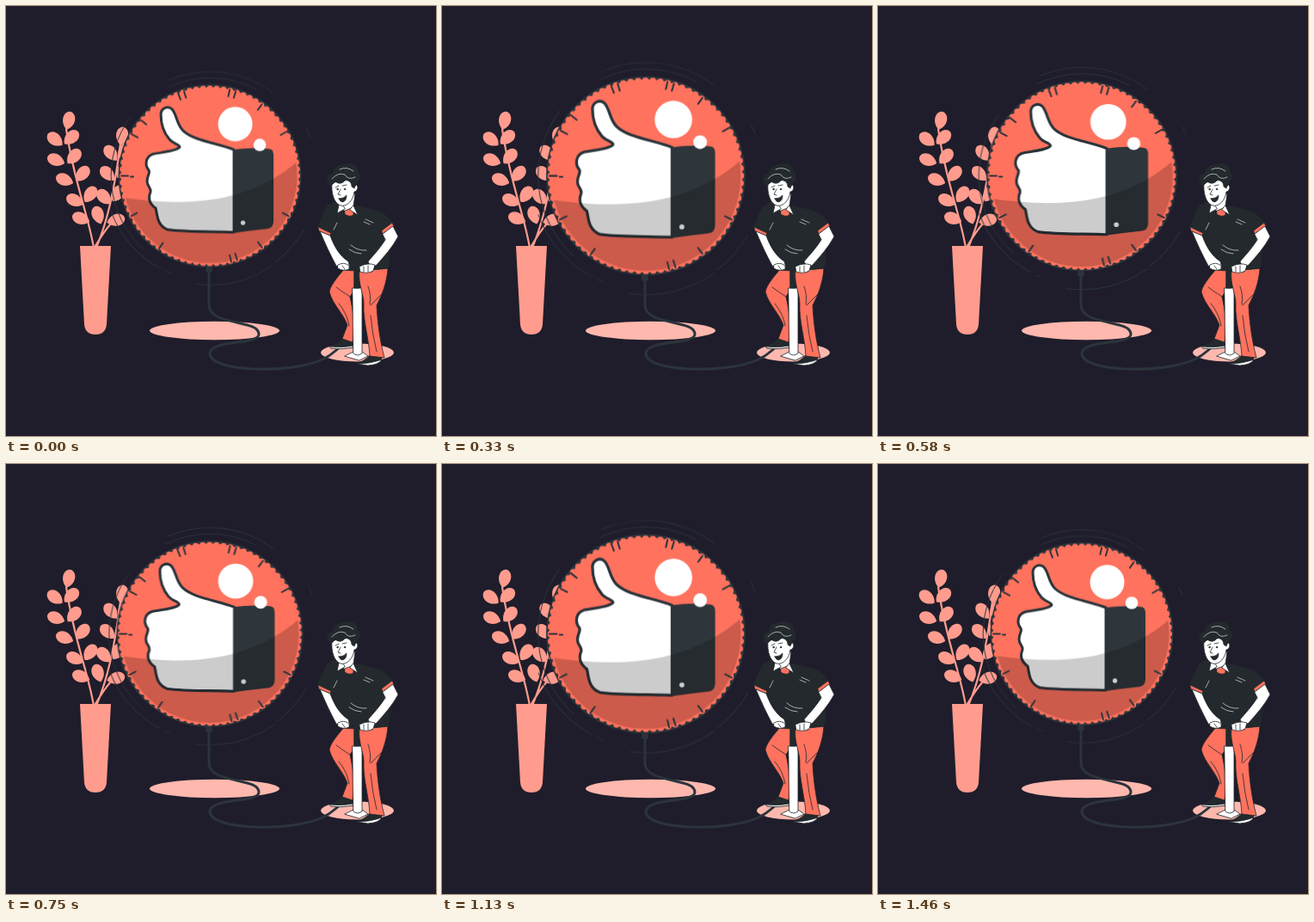
Animation, 500 px wide and 500 px high, one loop 1.5 s. Source, as an HTML page without scripts:

```html
<!DOCTYPE html>
<html lang="en">
<head>
<meta charset="utf-8">
<title>Inflating a thumbs-up balloon</title>
<style>
  html, body { margin: 0; width: 100%; height: 100%; overflow: hidden; background: #1f1d2b; }
  svg { display: block; width: 100vw; height: 100vh; }
  .dark { fill: #23292c; }
  .coral { fill: #ff725e; }
  .soft { fill: #ff9c8e; }
  .pale { fill: #ffb8ae; }
  .white { fill: #fff; }
  .line { fill: none; stroke: #2b343b; stroke-linecap: round; stroke-linejoin: round; }
  .thin { stroke: #23292c; stroke-width: .8; stroke-linejoin: round; stroke-linecap: round; }
  .crease { fill: none; stroke: #dfe2e3; stroke-width: .7; stroke-linecap: round; }
  .stem { fill: none; stroke: #ff9c8e; stroke-width: 2.2; stroke-linecap: round; }
  .balloon { animation: inflate 1.5s linear infinite; }
  @keyframes inflate {
    0% { transform: scale(1); }
    11.3% { transform: scale(1.056); }
    20.5% { transform: scale(1.09); }
    23% { transform: scale(1.088); }
    38.7% { transform: scale(1.042); }
    59.7% { transform: scale(1); }
    75.2% { transform: scale(1.09); }
    97.3%, 100% { transform: scale(1); }
  }
</style>
</head>
<body>
<svg viewBox="0 0 500 500">
  <defs>
    <path id="leaf" d="M0 11C-9 5-9-7-2-10Q0-11 2-10C9-7 9 5 0 11Z"/>
    <path id="tick" d="M95 0H103"/>
    <clipPath id="inside"><circle cx="237" cy="197.5" r="101.5"/></clipPath>
  </defs>

  <rect width="500" height="500" fill="#1f1d2b"/>
  <ellipse class="pale" cx="242.5" cy="377.5" rx="75.5" ry="10.7"/>

  <g class="soft">
    <path class="stem" d="M102 281C95 240 79 205 70 143M105 281C118 250 126 215 133 160M104 279Q114 262 122 253"/>
    <use href="#leaf" transform="translate(73 133) rotate(12)"/>
    <use href="#leaf" transform="translate(57 155) rotate(-52)"/>
    <use href="#leaf" transform="translate(76 153) rotate(48)"/>
    <use href="#leaf" transform="translate(58 179) rotate(-68)"/>
    <use href="#leaf" transform="translate(79 175) rotate(42)"/>
    <use href="#leaf" transform="translate(68 202) rotate(-68)"/>
    <use href="#leaf" transform="translate(89 195) rotate(40)"/>
    <use href="#leaf" transform="translate(80 226) rotate(-65)"/>
    <use href="#leaf" transform="translate(98 219) rotate(35)"/>
    <use href="#leaf" transform="translate(87 247) rotate(-68)"/>
    <use href="#leaf" transform="translate(107 243) rotate(-18)"/>
    <use href="#leaf" transform="translate(135 151) rotate(8)"/>
    <use href="#leaf" transform="translate(122 171) rotate(-38)"/>
    <use href="#leaf" transform="translate(138 168) rotate(40)"/>
    <use href="#leaf" transform="translate(118 195) rotate(-45)"/>
    <use href="#leaf" transform="translate(136 191) rotate(35)"/>
    <use href="#leaf" transform="translate(114 222) rotate(-42)"/>
    <use href="#leaf" transform="translate(130 218) rotate(32)"/>
    <use href="#leaf" transform="translate(128 249) rotate(75)"/>
    <path d="M86 279H122L117 370Q116 382 104 382T91 370Z"/>
  </g>

  <ellipse class="pale" cx="408.5" cy="403" rx="42.5" ry="10.5"/>
  <path class="line" stroke-width="3" d="M236 300V348C236 372 295 364 294 382C293 394 238 388 237 404C237 426 331 428 368 411C388 402 384 392 407 392"/>

  <g transform="translate(237 197.5)">
    <g class="balloon">
      <g class="line" stroke-width=".9">
        <circle r="121" pathLength="360" stroke-dasharray="60 300" transform="rotate(-113)"/>
        <circle r="114" pathLength="360" stroke-dasharray="54 306" transform="rotate(-116)"/>
        <circle r="125" pathLength="360" stroke-dasharray="5 355" transform="rotate(-26)"/>
        <circle r="126" pathLength="360" stroke-dasharray="23 337" transform="rotate(30)"/>
        <circle r="127" pathLength="360" stroke-dasharray="43 317" transform="rotate(55)"/>
        <circle r="122" pathLength="360" stroke-dasharray="3 3 42 312" transform="rotate(112)"/>
        <circle r="115" pathLength="360" stroke-dasharray="85 275" transform="rotate(132)"/>
      </g>
      <path fill="#2b343b" d="M-4 105H2L3 112H-5Z"/>
      <circle r="106.5" fill="#2b343b"/>
      <circle class="coral" r="103"/>
      <circle r="101.5" fill="none" stroke="#ff725e" stroke-width="7" stroke-linecap="round" pathLength="80" stroke-dasharray="0 1"/>

      <g transform="translate(-237 -197.5)">
        <path class="line" style="fill:#fff" stroke-width="3" d="M265 167C245 159 219 157 206 145C198 137 199 127 193 120C188 115 180 119 180 126C180 140 184 148 190 155C194 160 202 161 202 164C198 169 181 170 171 172C162 175 161 185 166 191C168 194 164 197 164 204C164 210 169 211 168 216C165 223 167 230 174 235C176 242 175 255 188 260C209 263 239 262 265 263Z"/>
        <path fill="#2e363b" d="M264 167Q285 164 305 166Q311 166 311 173V250Q311 258 304 259Q285 261 264 264Z"/>
        <circle cx="275.5" cy="252" r="2.7" fill="#fff"/>
        <path clip-path="url(#inside)" fill="#000" opacity=".2" d="M130 222C203 233 283 234 345 175V305H130Z"/>
        <circle class="white" cx="266.5" cy="137.3" r="20"/>
        <circle class="white" cx="295" cy="161.5" r="7.3"/>
      </g>

      <g class="line" stroke-width="1.9">
        <use href="#tick" transform="rotate(-111)"/>
        <use href="#tick" transform="rotate(-107)"/>
        <use href="#tick" transform="rotate(-77)"/>
        <use href="#tick" transform="rotate(-73)"/>
        <use href="#tick" transform="rotate(-54)"/>
        <use href="#tick" transform="rotate(-30)"/>
        <use href="#tick" transform="rotate(27)"/>
        <use href="#tick" transform="rotate(54)"/>
        <use href="#tick" transform="rotate(72)"/>
        <use href="#tick" transform="rotate(76)"/>
        <use href="#tick" transform="rotate(125)"/>
        <use href="#tick" transform="rotate(153)"/>
        <use href="#tick" transform="rotate(180)"/>
        <use href="#tick" transform="rotate(-152)"/>
        <use href="#tick" transform="rotate(-141)"/>
        <path d="M-92 1H-89"/>
      </g>
    </g>
  </g>

  <g class="thin">
    <path class="dark" d="M377 396Q386 393 391 387L404 391V397Q390 399 379 398Z"/>
    <path class="white" d="M377 396Q390 398 404 395V397Q390 400 378 398Z"/>
    <path class="coral" d="M393 306C387 314 378 323 376 332C379 346 392 357 397 371L391 387L403 391C407 373 403 352 400 338L412 320V306Z"/>
    <path fill="none" d="M384 327Q392 333 400 338M387 346Q397 358 399 372"/>
    <path class="white" d="M394 407L404 402H414L421 407L411 412Z"/>
    <path class="white" d="M403 328H414V404Q408 408 404 404Z"/>
    <path class="dark" d="M405 307H411V328H405Z"/>
    <path class="dark" d="M408 416Q418 412 423 406L438 408Q435 415 422 417Z"/>
    <path class="white" d="M408 416Q424 416 437 411Q434 417 421 418Z"/>
    <path class="coral" d="M411 307L444 305C443 320 438 335 431 348C432 369 435 390 440 409L423 407C422 386 415 366 416 346C416 335 409 323 411 307Z"/>
    <path fill="none" d="M437 335L424 348M421 326Q425 337 423 347M424 360Q426 382 431 402"/>

    <path class="white" d="M390 226L406 218L404 233L410 240L400 248L388 236Z"/>
    <path class="dark" d="M383 227L373 233L362 257L377 265L381 274L391 292L396 304Q420 309 444 305Q450 292 440 265L450 253Q441 240 428 237L407 232L399 244Z"/>
    <path class="coral" d="M394 238L404 234L404 243Q399 246 394 242Z"/>
    <path class="white" d="M388 227L385 241L394 236ZM404 232L409 243L400 237Z"/>
    <path class="coral" d="M363 257L378 264L377 267L364 262ZM437 261L449 252L451 256L438 265Z"/>
    <path class="white" d="M365 262L377 267C381 278 387 290 398 297L400 304L392 307L384 302C377 289 371 276 365 262Z"/>
    <path class="white" d="M438 265L450 256L456 268C449 281 440 291 430 302L423 301L421 297C429 288 436 280 441 272Z"/>
    <path class="dark" d="M389 303L426 306V309L389 307Z"/>
    <path class="white" d="M386 301Q393 297 399 302V306Q392 309 386 305Z"/>
    <path class="white" d="M411 303Q420 298 429 301L427 308Q420 312 412 309Z"/>
    <path fill="none" d="M416 303V309M421 302V309M391 302L394 306"/>
    <path class="crease" d="M401 278Q409 285 419 284M399 283Q406 288 413 288M418 248L427 252M416 251L423 254M385 252L381 260"/>

    <path class="white" d="M379 206C378 217 381 229 389 232C397 234 404 225 405 216C410 215 410 207 406 208L400 201Z"/>
    <path class="dark" d="M377 209C371 203 374 195 380 195C380 186 389 185 394 184C402 181 410 187 408 192C413 196 413 203 408 205L405 212L402 210C402 204 397 202 394 203C390 208 385 206 383 204Q380 208 377 209Z"/>
    <path class="crease" d="M379 201Q386 193 394 196Q398 203 406 199M388 190Q396 186 404 192"/>
    <path fill="none" d="M383 211L387 209M391 209L396 208M389 213L386 219L389 220"/>
    <circle class="dark" cx="385.500" cy="213" r=".8"/>
    <circle class="dark" cx="394" cy="213" r=".8"/>
    <path class="dark" d="M387 224Q393 224 396 220Q396 227 391 228Q388 227 387 224Z"/>
  </g>
</svg>
</body>
</html>
```
